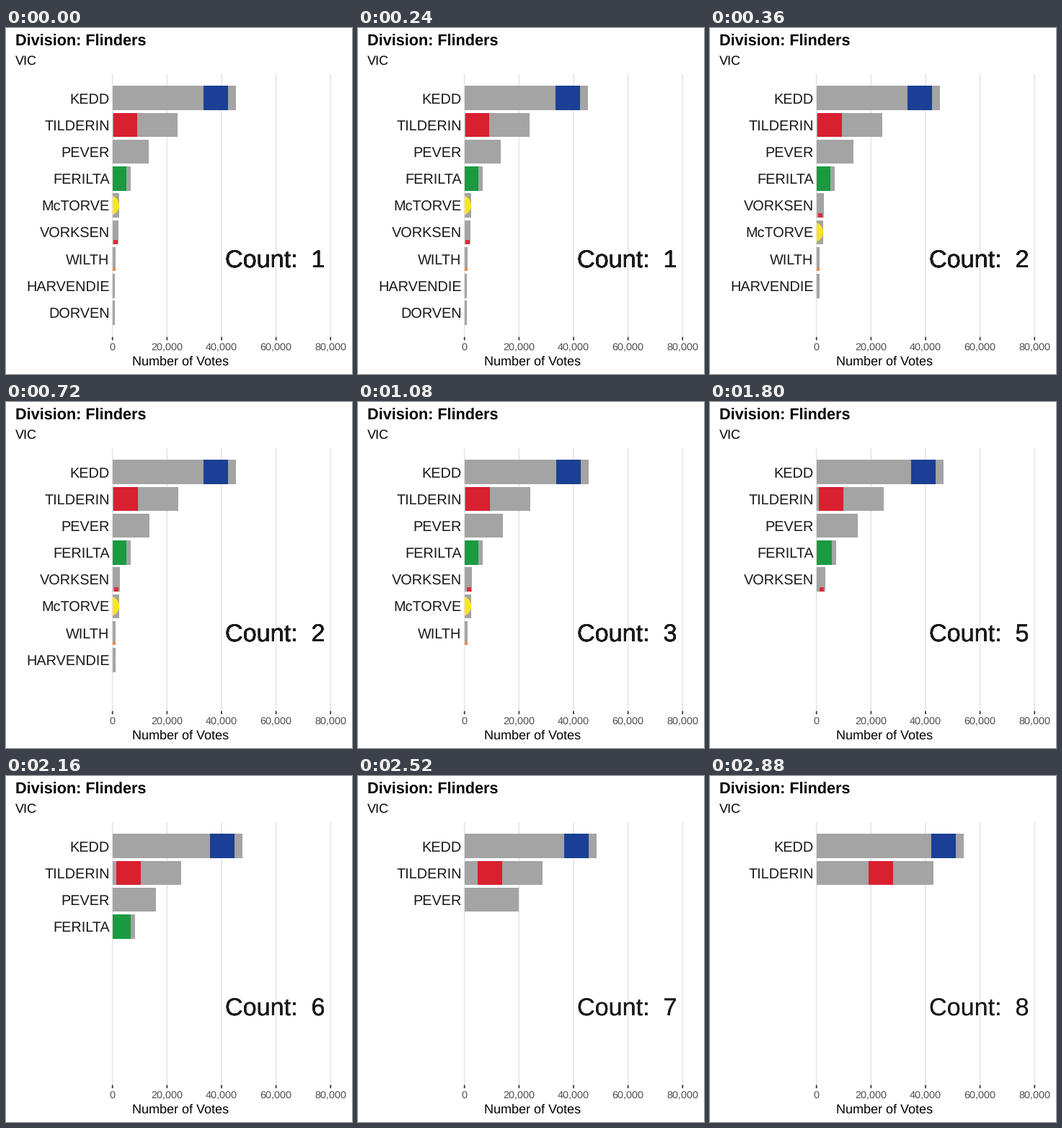
A matplotlib script that plays this animation: 480x480 px, repeating every 3 s.

```python
import matplotlib.pyplot as plt
from matplotlib.animation import FuncAnimation
from matplotlib.patches import Circle, Rectangle

SIZE, DPI = 480, 100
FRAMES, INTERVAL = 25, 120

plt.rcParams["font.family"] = "Liberation Sans"
plt.rcParams["text.hinting"] = "no_hinting"

# Panel geometry in pixels
X0, X_MAX, MAX_VOTES = 147.7, 450.3, 80000
TOP, BOTTOM = 64, 428.7
FIRST_Y, PITCH, BAR_H = 97.0, 37.25, 33.5

BAR, INK = "#a4a4a4", "#1a1a1a"

# Each round of counting: first frame, then votes by candidate in rank order
ROUNDS = [
    (0, {"KEDD": 45290, "TILDERIN": 24000, "PEVER": 13300, "FERILTA": 6700,
         "McTORVE": 2450, "VORKSEN": 2200, "WILTH": 1150,
         "HARVENDIE": 870, "DORVEN": 830}),
    (3, {"KEDD": 45320, "TILDERIN": 24080, "PEVER": 13560, "FERILTA": 6720,
         "VORKSEN": 2720, "McTORVE": 2480, "WILTH": 1170,
         "HARVENDIE": 1100}),
    (7, {"KEDD": 45560, "TILDERIN": 24140, "PEVER": 14080, "FERILTA": 6760,
         "VORKSEN": 2760, "McTORVE": 2500, "WILTH": 1200}),
    (10, {"KEDD": 45800, "TILDERIN": 24300, "PEVER": 14400, "FERILTA": 6900,
          "VORKSEN": 2950, "McTORVE": 2650}),
    (13, {"KEDD": 46600, "TILDERIN": 24680, "PEVER": 15150, "FERILTA": 7220,
          "VORKSEN": 3250}),
    (16, {"KEDD": 47680, "TILDERIN": 25200, "PEVER": 15950, "FERILTA": 8300}),
    (19, {"KEDD": 48450, "TILDERIN": 28640, "PEVER": 19950}),
    (22, {"KEDD": 54000, "TILDERIN": 42950}),
]

# Party badges: shape, colour, offset from bar end, offset from bar centre, size
BADGES = {
    "KEDD": (Rectangle, "#1b3f94", -28, 0, BAR_H),
    "TILDERIN": (Rectangle, "#d9202f", -73, 0, BAR_H),
    "FERILTA": (Rectangle, "#1b9a42", -23, 0, BAR_H),
    "McTORVE": (Circle, "#f8e61c", -14, 0, 28),
    "VORKSEN": (Rectangle, "#dc2b3c", -4.5, 13.7, 6),
    "WILTH": (Rectangle, "#e08a4a", -2, 14.7, 4),
}

fig = plt.figure(figsize=(SIZE / DPI, SIZE / DPI), dpi=DPI, facecolor="white")
ax = fig.add_axes([0, 0, 1, 1])
ax.set_xlim(0, SIZE)
ax.set_ylim(SIZE, 0)
ax.axis("off")

panel = Rectangle((X0, TOP), SIZE - X0, BOTTOM - TOP, transform=ax.transData)
moving = []


def pt(px):
    return px * 72 / DPI


def x_of(votes):
    return X0 + votes / MAX_VOTES * (X_MAX - X0)


def text(x, y, s, px, color="black", **kw):
    return ax.text(x, y, s, fontsize=pt(px), color=color, va="baseline", **kw)


def vline(x, y0, y1, color, zorder):
    ax.plot([x, x], [y0, y1], color=color, lw=pt(1.75), snap=False,
            solid_capstyle="butt", zorder=zorder)


def draw_static():
    text(12.6, 25, "Division: Flinders", 21.6, weight="bold")
    text(13, 51, "VIC", 18)
    text(242, 468, "Number of Votes", 18, ha="center")
    for votes in range(0, MAX_VOTES + 1, 20000):
        x = x_of(votes)
        vline(x, TOP, BOTTOM, "#e6e6e6", 0)
        vline(x, BOTTOM, BOTTOM + 4.5, "#333333", 1)
        text(x, 447, f"{votes:,}", 14.4, "#4d4d4d", ha="center")


def draw_badge(name, end, y):
    shape, color, dx, dy, size = BADGES[name]
    cx, cy = end + dx, y + dy
    if shape is Circle:
        patch = Circle((cx, cy), size / 2, fc=color, lw=0, zorder=3)
    else:
        patch = Rectangle((cx - size / 2, cy - size / 2), size, size,
                          fc=color, lw=0, zorder=3)
    ax.add_patch(patch)
    patch.set_clip_path(panel)
    moving.append(patch)


def draw_row(rank, name, votes):
    y, end = FIRST_Y + rank * PITCH, x_of(votes)
    bar = Rectangle((X0, y - BAR_H / 2), end - X0, BAR_H,
                    fc=BAR, lw=0, zorder=2)
    moving.append(ax.add_patch(bar))
    if name in BADGES:
        draw_badge(name, end, y)
    moving.append(text(143.7, y + 7.7, name, 19.9, INK, ha="right"))


def update(frame):
    while moving:
        moving.pop().remove()
    count = sum(start <= frame for start, _ in ROUNDS)
    tally = ROUNDS[count - 1][1]
    for rank, (name, votes) in enumerate(tally.items()):
        draw_row(rank, name, votes)
        # One overlaid counter per row gives the text its crisp edge
        moving.append(text(304, 333, f"Count:  {count}", 34.1, INK, zorder=4))
    return moving


draw_static()
anim = FuncAnimation(fig, update, frames=FRAMES, interval=INTERVAL,
                     repeat=True, repeat_delay=0, blit=False)
plt.show()
```
